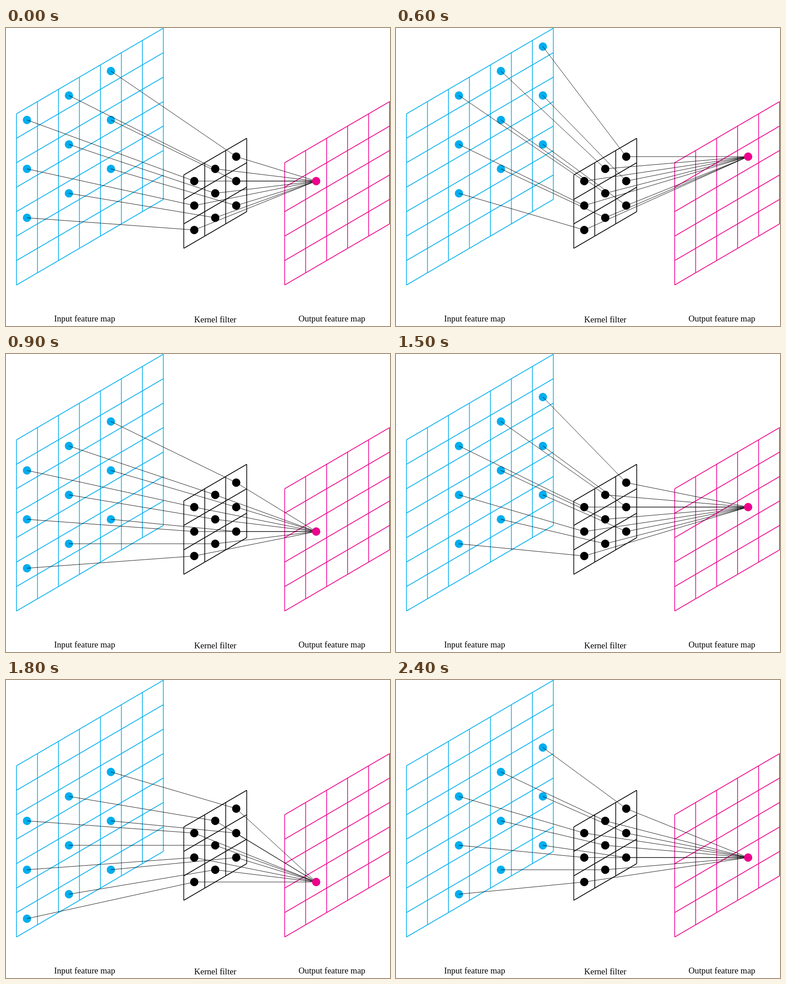
An HTML page with a canvas that plays this animation: 850 by 658 pixels, repeating every 2700 ms.

```html
<!DOCTYPE html>
<html lang="en">
<head>
<meta charset="utf-8">
<title>Dilated convolution</title>
<style>
  html, body { margin: 0; width: 100%; height: 100%; overflow: hidden; background: #fff; }
  canvas { display: block; }
</style>
</head>
<body>
<canvas id="stage" width="850" height="658"></canvas>
<script>
const ctx = document.getElementById('stage').getContext('2d');
const CELL_W = 46.44, CELL_H = 54, SLANT = 27;
const STEP_MS = 300, STEPS = 9, DILATION = 2;

const input = { x: 23.2, y: 189.5, size: 7, color: '#00aeef' };
const kernel = { x: 393.5, y: 324.5, size: 3, color: '#000' };
const output = { x: 616.9, y: 297.5, size: 5, color: '#ec008c' };

// Grid coordinates to stage coordinates
function project(grid, col, row) {
  return [grid.x + col * CELL_W, grid.y + row * CELL_H - col * SLANT];
}

function center(grid, col, row) {
  return project(grid, col + 0.5, row + 0.5);
}

function line(a, b, color, width) {
  ctx.strokeStyle = color;
  ctx.lineWidth = width;
  ctx.beginPath();
  ctx.moveTo(...a);
  ctx.lineTo(...b);
  ctx.stroke();
}

function dot([x, y], color) {
  ctx.fillStyle = color;
  ctx.beginPath();
  ctx.arc(x, y, 9.2, 0, Math.PI * 2);
  ctx.fill();
}

function drawGrid(grid) {
  const n = grid.size;
  for (let i = 0; i <= n; i++) {
    line(project(grid, i, 0), project(grid, i, n), grid.color, 1.6);
    line(project(grid, 0, i), project(grid, n, i), grid.color, 1.6);
  }
}

function drawLabels() {
  ctx.fillStyle = '#000';
  ctx.font = '19.05px "Liberation Serif", Times, serif';
  ctx.textAlign = 'center';
  ctx.fillText('Input feature map', 174.1, 648);
  ctx.fillText('Kernel filter', 463.2, 650);
  ctx.fillText('Output feature map', 721.4, 648);
}

function drawStep(step) {
  const col = step % 3, row = Math.floor(step / 3);
  const target = center(output, col + 1, row + 1);

  ctx.fillStyle = '#fff';
  ctx.fillRect(0, 0, 850, 658);
  [input, kernel, output].forEach(drawGrid);

  const links = [];
  for (let r = 0; r < 3; r++) {
    for (let c = 0; c < 3; c++) {
      links.push([center(input, col + c * DILATION, row + r * DILATION), center(kernel, c, r)]);
    }
  }
  for (const [from, via] of links) {
    dot(from, input.color);
    dot(via, kernel.color);
  }
  for (const [from, via] of links) {
    line(from, via, '#000', 0.9);
    line(via, target, '#000', 0.9);
  }
  dot(target, output.color);
  drawLabels();
}

const start = performance.now();
function tick() {
  drawStep(Math.floor((performance.now() - start) / STEP_MS) % STEPS);
  requestAnimationFrame(tick);
}
tick();
</script>
</body>
</html>
```
